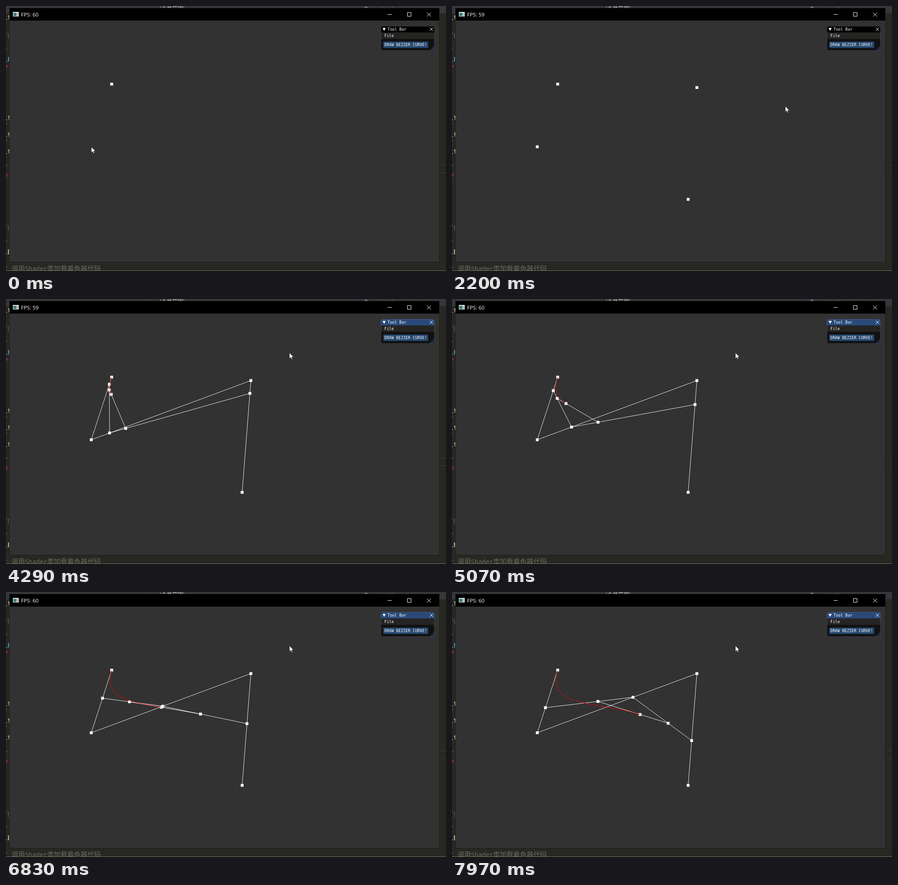
An HTML page with a canvas for the animation above (8000 ms loop, 964 by 581 pixels).

```html
<!DOCTYPE html>
<html lang="en">
<head>
<meta charset="utf-8">
<title>Bezier curve construction</title>
<style>
  html, body { margin: 0; width: 100%; height: 100%; overflow: hidden; background: #272822; }
  svg, canvas { position: absolute; left: 0; top: 0; width: 964px; height: 581px; }
  text { white-space: pre; }
  .code { font: 13.5px "DejaVu Sans Mono", monospace; }
  .cjk { font-family: "Noto Sans CJK SC", "Noto Sans CJK", sans-serif; font-size: 14.7px; }
  .caption { font: 11.5px "Open Sans", sans-serif; fill: #fff; }
  .ui { font: 8.6px "DejaVu Sans Mono", monospace; fill: #fff; }
  .gray { fill: #6b6a60; }
  .pale { fill: #e9e6cf; }
  .blue { fill: #5fb9dc; }
  .pink { fill: #f92672; }
  #cursor { animation: move 8s infinite; }
  #titlebar { animation: focus 8s step-end infinite; }
  #button { animation: press 8s step-end infinite; }
  @keyframes move {
    0%, 3% { transform: translate(187px, 309px); animation-timing-function: ease-in-out; }
    12.5%, 13.5% { transform: translate(536px, 179px); animation-timing-function: ease-in-out; }
    20.4%, 22.75% { transform: translate(517px, 424px); animation-timing-function: ease-in; }
    27.5% { transform: translate(730px, 220px); animation-timing-function: linear; }
    32.6% { transform: translate(836px, 106px); animation-timing-function: ease-out; }
    37%, 45% { transform: translate(868px, 89px); animation-timing-function: ease-in-out; }
    53%, 100% { transform: translate(621px, 118px); }
  }
  @keyframes focus {
    0% { fill: #000; }
    41.4%, 100% { fill: #294a7a; }
  }
  @keyframes press {
    0% { fill: #25476f; }
    34.5% { fill: #4296fa; }
    41.4% { fill: #0f87fa; }
    42.4% { fill: #4296fa; }
    46.4%, 100% { fill: #25476f; }
  }
</style>
</head>
<body>
<svg viewBox="0 0 964 581">
  <!-- editor behind the window -->
  <rect width="964" height="581" fill="#272822"/>
  <rect width="964" height="16" fill="#37373a"/>
  <path d="M318.5 0V5M781.5 0V5" stroke="#4a4a4e"/>
  <text class="cjk" x="336" y="11" style="font-size:12px" fill="#d0d0d0">(全局范围)</text>
  <circle cx="789" cy="6" r="4.5" fill="#8577a8"/>
  <text class="code" x="811" y="11" style="font-size:11px" fill="#d0d0d0">main()</text>
  <path d="M0 348.5H964M0 365.5H964" stroke="#3b3c37"/>
  <g class="code">
    <g class="pale">
      <text x="-5" y="30">lt</text>
      <text x="-5" y="250">lt</text>
      <text x="-5" y="287">lt</text>
      <text x="-5" y="324">lt</text>
      <text x="-5" y="544">lE</text>
    </g>
    <g class="gray">
      <text x="-5" y="68">/g</text>
      <text x="-5" y="101">/</text>
      <text x="-5" y="266">/</text>
      <text x="-5" y="303">/</text>
      <text x="-5" y="358">/</text>
      <text x="-5" y="490">/g</text>
      <text x="-5" y="523">/</text>
      <text x="-5" y="581">/</text>
    </g>
    <text class="blue" x="-5" y="122">LF</text>
    <text class="pink" x="-4" y="137">=</text>
    <text class="pink" x="-4" y="376">=</text>
  </g>
  <text class="gray code" x="12" y="581"><tspan class="cjk">调用</tspan>Shader<tspan class="cjk">类加载着色器代码</tspan></text>
  <path d="M0 580.5H964" stroke="#75735f"/>

  <!-- application window -->
  <rect x="7.5" y="4.5" width="942" height="557" fill="none" stroke="#1c1d19"/>
  <rect x="8" y="5" width="941" height="556" fill="#323232"/>
  <rect x="8" y="5" width="941" height="27"/>
  <rect x="15" y="13" width="13" height="10" fill="#dfe5e5"/>
  <rect x="16" y="15" width="7" height="7" fill="#3f7f7c"/>
  <rect x="24" y="15" width="3" height="7" fill="#a9b5b8"/>
  <text class="caption" id="fps" x="33" y="23">FPS: 60</text>
  <path d="M836 18.5H845M879.5 14.5H887.5V22.5H879.5ZM922.5 14.5L931 23M931 14.5L922.5 23" fill="none" stroke="#fff"/>

  <!-- tool panel -->
  <clipPath id="panel"><rect x="821" y="44" width="118" height="54" rx="5"/></clipPath>
  <g clip-path="url(#panel)">
    <rect x="821" y="44" width="118" height="54" fill="#111"/>
    <rect id="titlebar" x="821" y="44" width="118" height="14"/>
    <rect x="821" y="58" width="118" height="14" fill="#242422"/>
    <path d="M939 86V98H927Z" fill="#1b2c41"/>
  </g>
  <rect x="821.5" y="44.5" width="117" height="53" rx="4.5" fill="none" stroke="#6e6e80" stroke-opacity=".4"/>
  <path d="M825 48H832L828.5 54.5Z" fill="#fff"/>
  <path d="M928.5 47.5L935.5 54.5M935.5 47.5L928.5 54.5" stroke="#fff"/>
  <rect id="button" x="826.5" y="78" width="98.5" height="14"/>
  <g class="ui">
    <text x="836" y="54">Tool Bar</text>
    <text x="829" y="68">File</text>
    <text x="829" y="88">DRAW BEZIER CURVE!</text>
  </g>
</svg>
<canvas id="scene" width="964" height="581"></canvas>
<svg viewBox="0 0 964 581">
  <path id="cursor" d="M0 0V12.4L2.9 9.8L4.9 14.2L6.8 13.4L4.9 9.1H8.7Z" fill="#fff" stroke="#111" stroke-width=".6"/>
</svg>
<script>
  const LOOP = 8000;
  const DRAW_START = 3395;
  const controls = [[231.5, 171.3], [186.8, 308.6], [536.5, 178.8], [517.4, 423.9]];
  const clickTimes = [0, 240, 1030, 1630];
  // [ms, curve parameter]
  const progress = [[DRAW_START, 0], [5070, .2146], [5750, .306], [6830, .448], [LOOP, .6034]];

  const ctx = document.getElementById('scene').getContext('2d');
  const fpsLabel = document.getElementById('fps');
  ctx.lineWidth = .9;

  const mix = (a, b, u) => [a[0] + (b[0] - a[0]) * u, a[1] + (b[1] - a[1]) * u];
  const reduce = (points, u) => points.slice(1).map((p, i) => mix(points[i], p, u));

  function levels(u) {
    const result = [controls];
    while (result.at(-1).length > 1) result.push(reduce(result.at(-1), u));
    return result;
  }

  function parameterAt(ms) {
    const i = Math.max(1, progress.findIndex(([time]) => time >= ms));
    const [t0, u0] = progress[i - 1], [t1, u1] = progress[i];
    return u0 + (u1 - u0) * (ms - t0) / (t1 - t0);
  }

  function polyline(points, color) {
    ctx.strokeStyle = color;
    ctx.beginPath();
    points.forEach(p => ctx.lineTo(...p));
    ctx.stroke();
  }

  const square = ([x, y]) => ctx.fillRect(x - 3.1, y - 3.1, 6.2, 6.2);

  function drawConstruction(u) {
    const steps = levels(u);
    steps.forEach(points => polyline(points, '#fff'));
    steps.flat().forEach(square);
    const count = Math.max(1, Math.ceil(u * 100));
    const curve = Array.from({ length: count + 1 }, (_, i) => levels(u * i / count).at(-1)[0]);
    polyline(curve, '#f00');
  }

  function render(ms) {
    fpsLabel.textContent = 'FPS: ' + ((ms + 610) % 690 < 140 ? 59 : 60);
    ctx.clearRect(0, 0, 964, 581);
    ctx.fillStyle = '#fff';
    if (ms < DRAW_START) controls.filter((_, i) => ms >= clickTimes[i]).forEach(square);
    else drawConstruction(parameterAt(ms));
  }

  const start = performance.now();
  function tick() {
    render((performance.now() - start) % LOOP);
    requestAnimationFrame(tick);
  }
  tick();
</script>
</body>
</html>
```
